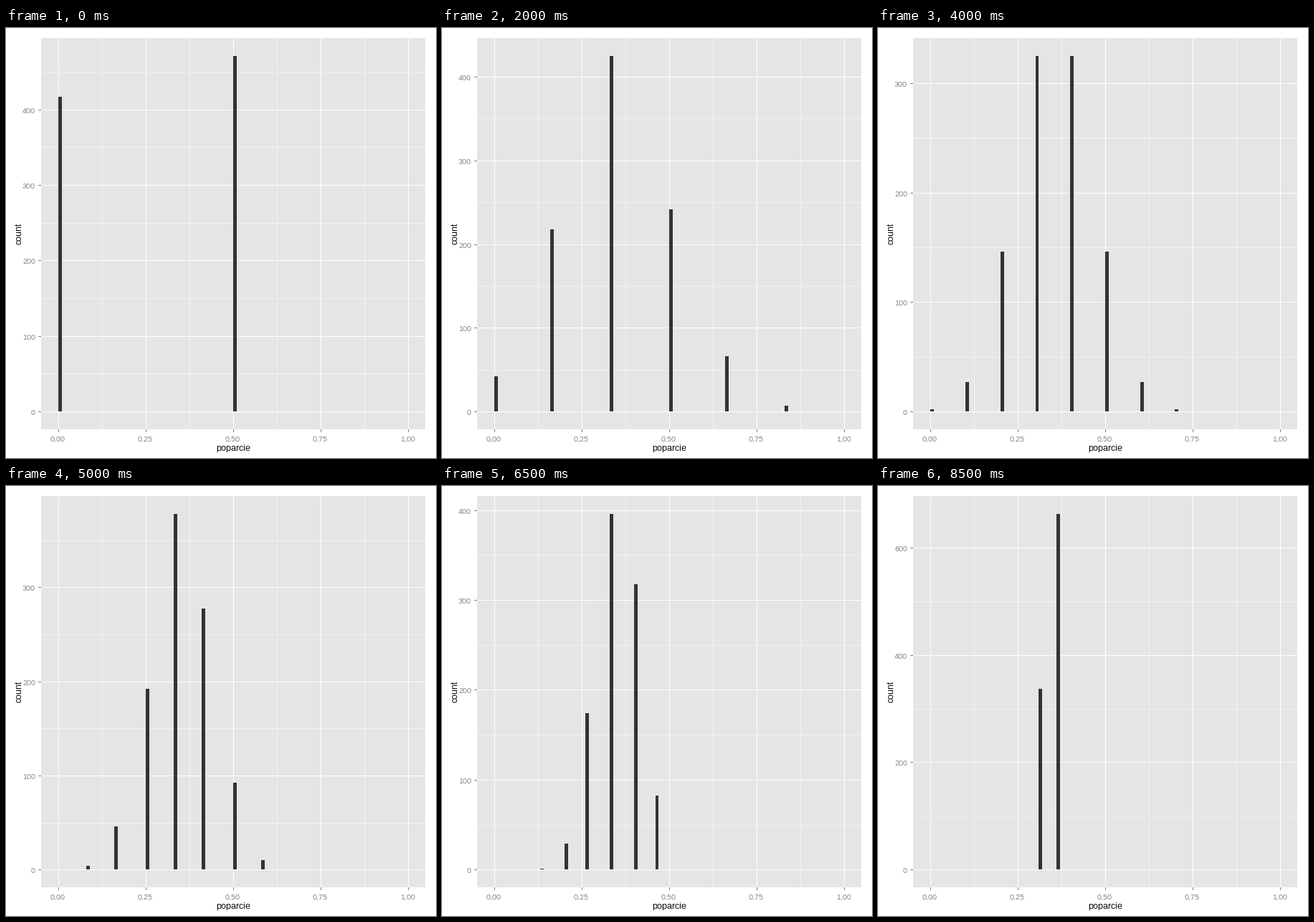
Recreate the animation shown at these times as a matplotlib script. Size 600x600 px, loop 9000 ms.

```python
from math import comb, floor

import matplotlib.pyplot as plt
from matplotlib.animation import FuncAnimation
from matplotlib.patches import Rectangle

# Whole-pixel glyph widths
plt.rcParams.update({"font.family": "Liberation Sans",
                     "text.hinting": "default", "text.hinting_factor": 1})

SIZE, DPI = 600, 100
LEFT, RIGHT, TOP, BOTTOM = 49, 585, 14, 560
X_UNIT = (RIGHT - LEFT) / 1.1
X_ZERO = LEFT + 0.05 * X_UNIT
Y_SPAN = (BOTTOM - TOP) / 1.1
Y_ZERO = BOTTOM - 0.05 * Y_SPAN

PANEL, MINOR, MAJOR = "#e5e5e5", "#f2f2f2", "#ffffff"
GREY, BAR = "#7f7f7f", "#333333"

# Samples of 2 to 19 drawn from 20 people, 7 of whom are supporters
PEOPLE, SUPPORTERS, TRIALS = 20, 7, 1000
# Height of the tallest bar for each sample size
PEAKS = [471, 470, 413, 394, 425, 352, 328, 358, 325,
         358, 378, 352, 392, 396, 413, 479, 470, 663]


def histogram(n, peak):
    """Hypergeometric counts: the mode gets the peak, the rest share what is left."""
    others = PEOPLE - SUPPORTERS
    ways = {k: comb(SUPPORTERS, k) * comb(others, n - k)
            for k in range(max(0, n - others), min(n, SUPPORTERS) + 1)}
    mode = max(ways, key=ways.get)
    scale = (TRIALS - peak) / (sum(ways.values()) - ways[mode])
    counts = {k: round(w * scale) for k, w in ways.items() if k < n}
    counts[mode] = peak
    return counts


def pixel(v):
    return floor(v + 0.5)


def x_pos(share):
    return pixel(X_ZERO + X_UNIT * share)


fig = plt.figure(figsize=(SIZE / DPI, SIZE / DPI), dpi=DPI, facecolor="white")
ax = fig.add_axes([0, 0, 1, 1])
ax.set_xlim(0, SIZE)
ax.set_ylim(SIZE, 0)
ax.axis("off")
moving = []


def box(x0, y0, x1, y1, color, z):
    rect = Rectangle((x0, y0), x1 - x0, y1 - y0, facecolor=color,
                     linewidth=0, antialiased=False, zorder=z)
    return ax.add_patch(rect)


def label(x, y, text, px, color, ha="center", rotation=0):
    return ax.text(x, y, text, fontsize=px * 72 / DPI, color=color, ha=ha,
                   va="baseline", rotation=rotation, rotation_mode="anchor",
                   zorder=6)


def draw_fixed():
    box(LEFT, TOP, RIGHT, BOTTOM, PANEL, 0)
    for i in range(9):
        x = x_pos(i / 8)
        major = i % 2 == 0
        box(x, TOP, x + 1, BOTTOM, MAJOR if major else MINOR, 2 if major else 1)
        if major:
            box(x, BOTTOM, x + 1, BOTTOM + 4, GREY, 2)
            label(x - 0.5, 577, f"{i / 8:.2f}".replace(".", ","), 10, GREY)
    label(317, 590, "poparcie", 12, "black")
    label(21, 286.5, "count", 12, "black", rotation=90)


def draw(frame):
    while moving:
        moving.pop().remove()
    n, peak = frame + 2, PEAKS[frame]

    def y_pos(count):
        return pixel(Y_ZERO - Y_SPAN * count / peak)

    half = 100 if peak > 500 else 50
    value = 0
    while y_pos(value) >= TOP:
        y = y_pos(value)
        major = value % (2 * half) == 0
        moving.append(box(LEFT, y, RIGHT, y + 1, MAJOR if major else MINOR,
                          2 if major else 1))
        if major:
            moving.append(box(LEFT - 4, y, LEFT, y + 1, GREY, 2))
            moving.append(label(41, y + 5, str(value), 10, GREY, ha="right"))
        value += half

    for k, count in histogram(n, peak).items():
        cell = 100 * k // n
        moving.append(box(x_pos(cell / 100), y_pos(count),
                          x_pos((cell + 1) / 100), y_pos(0), BAR, 4))
    return moving


draw_fixed()
anim = FuncAnimation(fig, draw, frames=len(PEAKS), interval=500,
                     repeat=True, repeat_delay=0, blit=False)
plt.show()
```
